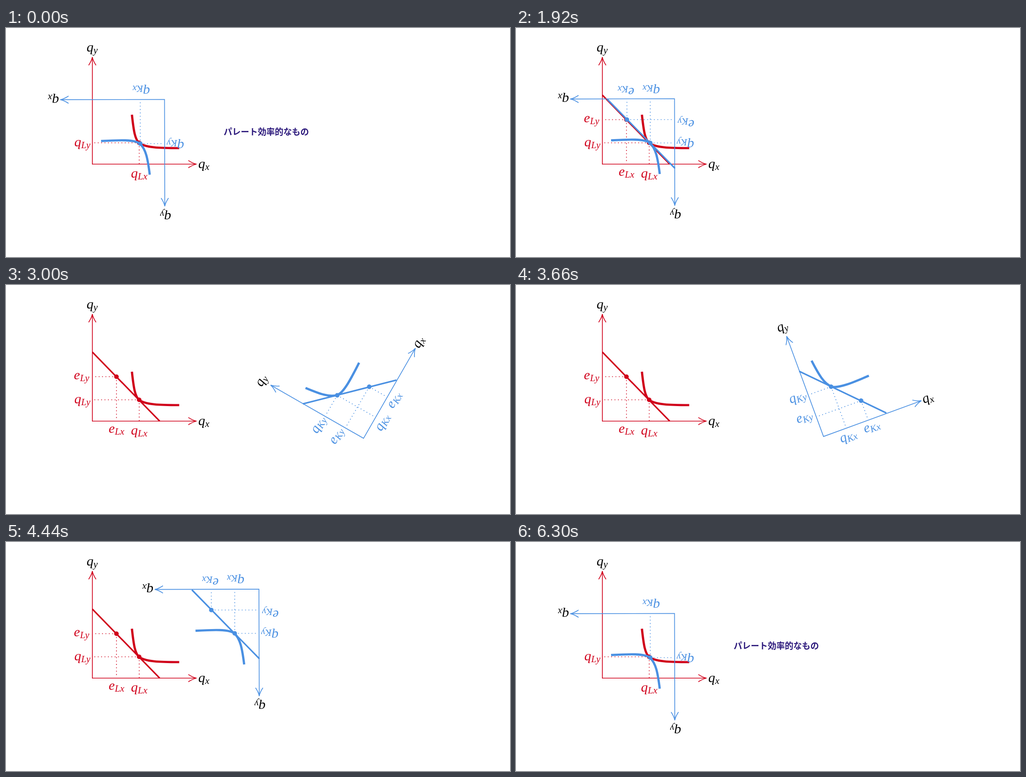
Recreate the animation shown at these times as an HTML page. Size 1108 px wide and 505 px high, loop 6780 ms.

```html
<!DOCTYPE html>
<html lang="ja">
<head>
<meta charset="utf-8">
<title>パレート効率</title>
<style>
  html, body { margin: 0; width: 100%; height: 100%; overflow: hidden; background: #fff; }
  svg { display: block; width: 1108px; height: 505px; }
  .red { --ink: #d0021b; }
  .blue { --ink: #4a90e2; }
  path { fill: none; stroke: var(--ink); stroke-width: 1.65; }
  .curve { stroke-width: 4.95; }
  .budget { stroke-width: 3.3; }
  .dots { stroke-dasharray: 1.86 5.57; }
  circle { fill: var(--ink); }
  .label { font: italic 30px "Liberation Serif", serif; fill: var(--ink); }
  .label.axis { fill: #000; }
  .label tspan { font-size: 21px; }
  #caption { font: bold 18.75px "Noto Sans CJK JP", "Noto Sans CJK", sans-serif; fill: #2d1a7c; }
</style>
</head>
<body>
<svg viewBox="0 0 1108 505">
  <g id="red" class="red" transform="translate(189.8 300.2)"></g>
  <g id="blue" class="blue"></g>
  <text id="caption" x="478.5" y="236.3">パレート効率的なもの</text>
</svg>
<script>
const FRAME = 60, FRAMES = 113;
const byId = id => document.getElementById(id);
const clamp = v => Math.min(1, Math.max(0, v));

const path = (d, cls = '') => `<path class="${cls}" d="${d}"/>`;
const label = ([x, y], main, sub, cls = '') =>
  `<text class="label ${cls}" x="${x}" y="${y}">${main}<tspan dy="4">${sub}</tspan></text>`;
const arrow = (x, y, angle) =>
  `<path transform="translate(${x} ${y}) rotate(${angle})" d="M-18 -8.1C-11.5 -3.8 -5.5 -1.1 0 0C-5.5 1.1 -11.5 3.8 -18 8.1"/>`;

// A point with dotted guides to both axes and its two labels
const bundle = (name, who, p) =>
  path(`M${p.at}H${p.left}M${p.at}V${p.bottom}`, 'dots') +
  `<circle cx="${p.at[0]}" cy="${p.at[1]}" r="5"/>` +
  label(p.xLabel, name, who + 'x') + label(p.yLabel, name, who + 'y');

// Chart coordinates start at the corner of its axes
const chart = (who, c) =>
  path(`M${c.tipX}L0 0L${c.tipY}`) + arrow(...c.tipX, 0) + arrow(...c.tipY, -90) +
  label(c.nameX, 'q', 'x', 'axis') + label(c.nameY, 'q', 'y', 'axis') +
  path(c.budget, 'budget') + path(c.curve, 'curve') +
  bundle('q', who, c.demand) +
  `<g class="endowment">${bundle('e', who, c.endowment)}</g>`;

byId('red').innerHTML = chart('L', {
  tipX: [229, 0], tipY: [0, -236],
  nameX: [233, 9], nameY: [-12.5, -248.5],
  budget: 'M0 -152.3L148 0',
  curve: 'M87 -109C91 -72 94 -54 103 -47C115 -36 150 -35.5 191 -35.3',
  demand: { at: [103, -47], left: 4, bottom: 0, xLabel: [85, 30], yLabel: [-39.5, -39.5] },
  endowment: { at: [53, -98], left: 6, bottom: -3, xLabel: [36, 25.7], yLabel: [-40.5, -92.5] }
});
byId('blue').innerHTML = chart('K', {
  tipX: [229, -.6], tipY: [-.6, -235.5],
  nameX: [232, 7], nameY: [-14.5, -250],
  budget: 'M147.5 -1.5L-1 -153.5',
  curve: 'M32.5 -166C37 -130 41 -110 54 -97.5C66 -88 100 -89.5 139.5 -91.8',
  demand: { at: [53.3, -97.5], left: 3, bottom: -5, xLabel: [32, 26.5], yLabel: [-43, -93] },
  endowment: { at: [104.7, -46], left: 3, bottom: -2, xLabel: [88.5, 24], yLabel: [-43.5, -46.5] }
});

const blue = byId('blue'), caption = byId('caption');
const redLine = document.querySelector('#red .budget');
const blueLine = document.querySelector('#blue .budget');
const endowments = document.querySelectorAll('.endowment');

// Shift of the blue chart: [step, dx, dy]
const ROUTE = [[0, 0, 0], [4, 105, -30], [7, 207.6, -52], [9, 357, -72], [11, 465.5, -88], [12, 495.8, -90.4]];
const SLIDE_STEPS = 12, TURN_STEPS = 9, STEPS = SLIDE_STEPS + TURN_STEPS;

function shiftAt(step) {
  const s = Math.min(step, SLIDE_STEPS);
  const i = Math.max(1, ROUTE.findIndex(p => p[0] >= s));
  const a = ROUTE[i - 1], b = ROUTE[i], u = (s - a[0]) / (b[0] - a[0]);
  return [a[1] + (b[1] - a[1]) * u, a[2] + (b[2] - a[2]) * u];
}

function draw(frame) {
  const joined = frame < 32 || frame >= 82;
  const step = joined ? 0 : Math.min(frame - 32, STEPS, 81 - frame);
  const [dx, dy] = shiftAt(step);
  const angle = -180 + 180 * clamp((step - SLIDE_STEPS) / TURN_STEPS);
  const drop = joined ? 1.5 : 0;
  blue.setAttribute('transform',
    `translate(${240.7 + dx} ${275.4 + dy + drop}) rotate(${angle}) translate(-107.8 119.4)`);

  const fade = clamp((frame - 8) / 9) - clamp((frame - 96) / 9);
  caption.style.opacity = 1 - fade;
  redLine.style.opacity = fade;
  blueLine.style.opacity = joined ? 0 : 1;
  const shown = frame >= 24 && frame < 90;
  endowments.forEach(g => g.style.display = shown ? '' : 'none');
}

const start = performance.now();
function tick(now) {
  draw(Math.floor(Math.max(0, now - start) / FRAME) % FRAMES);
  requestAnimationFrame(tick);
}
draw(0);
requestAnimationFrame(tick);
</script>
</body>
</html>
```
